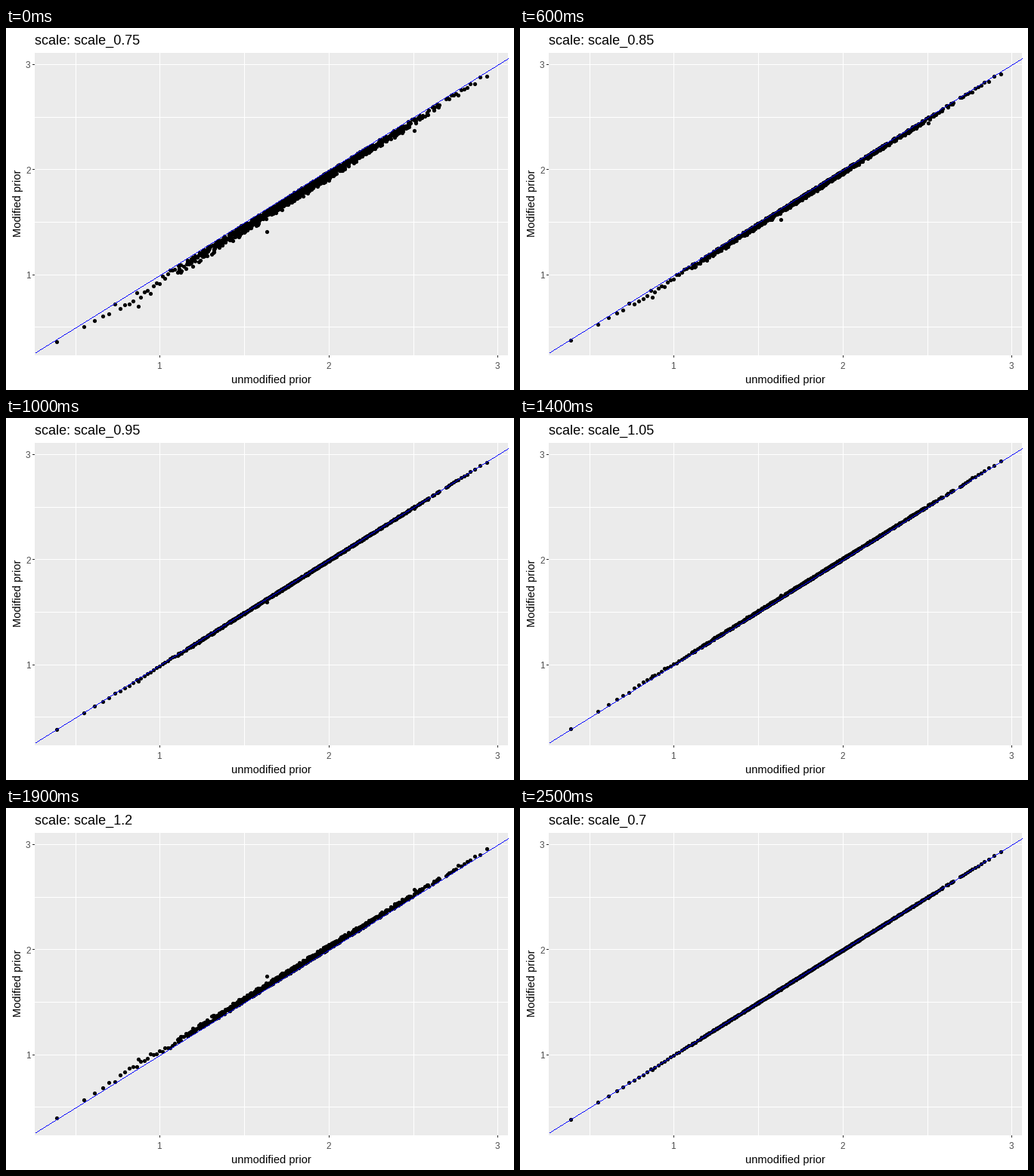
Recreate the animation shown at these times as a matplotlib script. Size 672 by 480 pixels, loop 2.6 s.

```python
import math

import numpy as np
import matplotlib.pyplot as plt
from matplotlib.animation import FuncAnimation
from matplotlib.patches import Rectangle

plt.rcParams["font.family"] = "Liberation Sans"

W, H, DPI = 672, 480, 96
LEFT, RIGHT, TOP, BOTTOM = 38, 664, 33, 434
FRAMES, INTERVAL = 26, 100
STATES = 0.7 + 0.05 * np.arange(13)


def px(value):
    return 203.9 + 223.5 * (value - 1)


def py(value):
    return 327.2 - 139.44 * (value - 1)


def identity_y(x):
    """Pixel height of the line y = x at pixel column x."""
    return py(1 + (x - px(1)) / 223.5)


def make_points(seed=8):
    """Pixel columns and their drops below the line at the lowest scale."""
    rng = np.random.default_rng(seed)
    bulk = rng.normal(393, 85, 1050)
    bulk = bulk[(bulk > 225) & (bulk < 585)]
    # Both tails thin out towards their ends
    low = 67 + 160 * np.linspace(0.04, 1, 24) ** 0.46
    high = 636 - 52 * np.linspace(0.05, 1, 12) ** 0.6
    x = np.concatenate([low, bulk, high])
    spread = np.interp(x, [150, 600], [18, 9])
    drop = 1.8 + spread * rng.beta(1.6, 2.6, x.size)
    # The two extremes and the most visible stragglers
    far_x, far_drop = [67, 175, 345, 540, 636], [3, 23.5, 30.7, 18.5, 6.5]
    return np.append(x, far_x), np.append(drop, far_drop)


def effect(scale):
    """Share of the full drop reached at a given scale."""
    u = 1 - scale
    return u * (3.08 + 0.83 * u)


fig = plt.figure(figsize=(W / DPI, H / DPI), dpi=DPI, facecolor="white")
ax = fig.add_axes([0, 0, 1, 1])
ax.set(xlim=(0, W), ylim=(H, 0))
ax.axis("off")


def box(x, y, w, h, color):
    ax.add_patch(Rectangle((x, y), w, h, facecolor=color, linewidth=0,
                           antialiased=False, zorder=1))


def label(x, y, text, size=11, color="black", **kw):
    return ax.text(x, y, text, fontsize=size, color=color,
                   va="baseline", **kw)


box(LEFT, TOP, RIGHT - LEFT, BOTTOM - TOP, "#EBEBEB")
for value in np.arange(0.5, 3.1, 0.5):
    col, row = math.floor(px(value)), math.floor(py(value))
    box(col, TOP, 1, BOTTOM - TOP, "white")
    box(LEFT, row, RIGHT - LEFT, 1, "white")
    if value == int(value):
        box(col, BOTTOM, 1, 3, "#333333")
        box(LEFT - 3, row, 3, 1, "#333333")
        label(col - 0.5, 452, f"{value:.0f}", 8.8, "#4D4D4D", ha="center")
        label(32.5, py(value) + 5, f"{value:.0f}", 8.8, "#4D4D4D",
              ha="right")

label((LEFT + RIGHT) / 2, 471, "unmodified prior", ha="center")
label(20, (TOP + BOTTOM) / 2 - 1.5, "Modified prior", ha="center",
      rotation=90, rotation_mode="anchor")
title = label(LEFT, 22, "", 13.5, ha="left")

xs, drops = make_points()
dots, = ax.plot([], [], "o", color="black", markersize=5.2 * 72 / DPI,
                markeredgewidth=0, antialiased=False, zorder=2)

# One pixel per column keeps the diagonal crisp
cols = np.arange(LEFT, RIGHT)
ax.plot(cols + 0.5, np.floor(identity_y(cols)) + 0.5, ",", color="blue",
        antialiased=False, zorder=3)


def update(frame):
    # Odd frames lie halfway between two neighbouring states
    now = frame // 2
    after = (now + frame % 2) % len(STATES)
    amount = (effect(STATES[now]) + effect(STATES[after])) / 2
    dots.set_data(xs - 0.5, identity_y(xs) + drops * amount)
    shown = STATES[after if frame else 1]
    title.set_text(f"scale: scale_{shown:.4g}")
    return dots, title


anim = FuncAnimation(fig, update, frames=FRAMES, interval=INTERVAL,
                     repeat=True, repeat_delay=0, blit=False)
plt.show()
```
